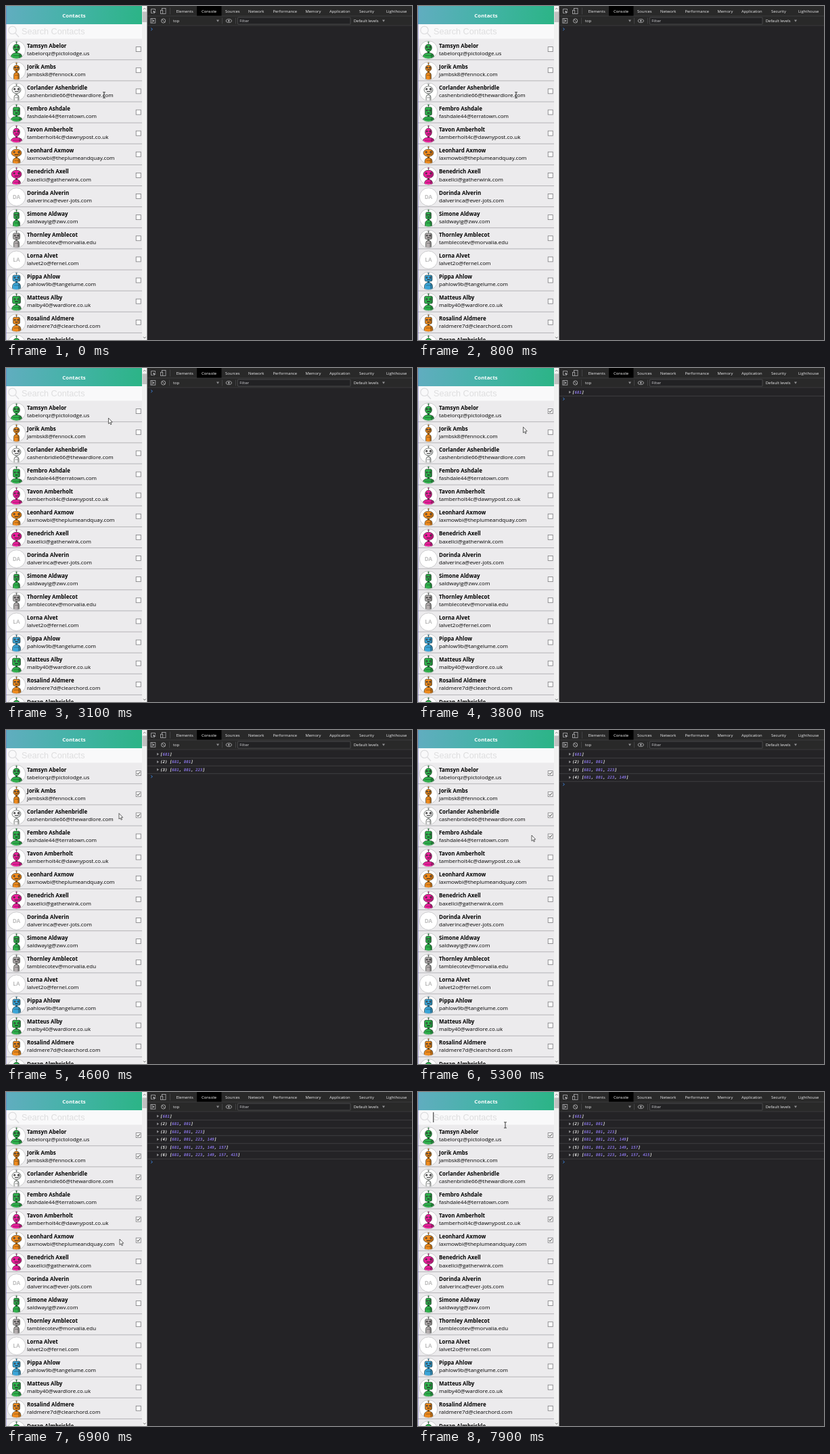
Recreate the animation shown at these times as an HTML page with a canvas. Size 600x495 px, loop 8 s.

```html
<!DOCTYPE html>
<html lang="en">
<head>
<meta charset="utf-8">
<title>Contacts</title>
<style>
  html, body { margin: 0; width: 100%; height: 100%; overflow: hidden; background: #242326; }
  canvas { display: block; width: 600px; height: 495px; }
</style>
</head>
<body>
<canvas id="stage"></canvas>
<script>
const LOOP = 8000, STEP = 100, W = 600, H = 495;
const ROW = 31.13, TOP = 49;
const SANS = '"Open Sans", "Noto Sans", sans-serif';
const ARIAL = '"Liberation Sans", Arial, sans-serif';
const MONO = '"DejaVu Sans Mono", monospace';
const UI = '500 5.88px ' + SANS;

const canvas = document.getElementById('stage');
const ctx = canvas.getContext('2d');
const dpr = window.devicePixelRatio || 1;
canvas.width = W * dpr;
canvas.height = H * dpr;

const GREEN = '#2fb04c', ORANGE = '#ee8a1d', PINK = '#ec1f9c', GREY = '#b3adae', BLUE = '#3ba5d8', WHITE = '#f4f4f4';

// name, email, then avatar: initials or [colour, head shape, head width, head height, body width]
const people = [
  ['Tamsyn Abelor', 'tabelorqz@pictolodge.us', [GREEN, 'egg', 10, 11, 17]],
  ['Jorik Ambs', 'jambsk8@fennock.com', [ORANGE, 'egg', 9, 9, 8]],
  ['Corlander Ashenbridle', 'cashenbridle66@thewardlore.com', [WHITE, 'egg', 13, 11, 7]],
  ['Fembro Ashdale', 'fashdale44@terratown.com', [GREEN, 'box', 10, 12, 18]],
  ['Tavon Amberholt', 'tamberholt4c@dawnypost.co.uk', [PINK, 'egg', 10, 12, 18]],
  ['Leonhard Axmow', 'laxmowbi@theplumeandquay.com', [ORANGE, 'egg', 15, 11, 11]],
  ['Benedrich Axell', 'baxellci@gatherwink.com', [PINK, 'egg', 15, 12, 12]],
  ['Dorinda Alverin', 'dalverinca@ever-jots.com', 'DA'],
  ['Simone Aldway', 'saldwayig@zwv.com', [GREEN, 'box', 8, 10, 10]],
  ['Thornley Amblecot', 'tamblecotev@morvalia.edu', [GREY, 'box', 10, 9, 8]],
  ['Lorna Alvet', 'lalvet2o@fernel.com', 'LA'],
  ['Pippa Ahlow', 'pahlow9b@tangelume.com', [BLUE, 'box', 11, 9, 12]],
  ['Matteus Alby', 'malby40@wardlore.co.uk', [GREEN, 'box', 12, 11, 14]],
  ['Rosalind Aldmere', 'raldmere7d@clearchord.com', [ORANGE, 'box', 10, 10, 13]],
  ['Doran Almbrickle', '', [GREEN, 'egg', 10, 11, 14]]
];

const ids = [681, 801, 223, 149, 157, 415];
const clicks = [3400, 4000, 4600, 5100, 5700, 6500];
const FOCUS = 7600;

// time, x, y of the pointer
const path = [
  [0, 145, 132], [1800, 145, 132], [2200, 143, 134], [2800, 143, 134],
  [3200, 153, 63], [3500, 153, 63], [3800, 155.5, 87.5], [4100, 157, 91],
  [4500, 167, 123.5], [4700, 167, 123.5], [5000, 168, 154], [5300, 168, 156],
  [5600, 168.5, 185], [5900, 168.5, 185.5], [6400, 168, 217], [6900, 168, 218],
  [7500, 131, 47], [7800, 129, 49], [8000, 129, 49]
];

function rect(x, y, w, h, color) {
  ctx.fillStyle = color;
  ctx.fillRect(x, y, w, h);
}

function text(s, x, y, font, color, align = 'left') {
  ctx.font = font;
  ctx.fillStyle = color;
  ctx.textAlign = align;
  ctx.fillText(s, x, y);
}

function line(points, color, width = 1) {
  ctx.beginPath();
  points.forEach(([x, y], i) => i ? ctx.lineTo(x, y) : ctx.moveTo(x, y));
  ctx.strokeStyle = color;
  ctx.lineWidth = width;
  ctx.stroke();
}

function paint(fill, stroke, width = 0.7) {
  if (fill) { ctx.fillStyle = fill; ctx.fill(); }
  if (stroke) { ctx.strokeStyle = stroke; ctx.lineWidth = width; ctx.stroke(); }
}

function poly(points, fill, stroke) {
  ctx.beginPath();
  points.forEach(([x, y]) => ctx.lineTo(x, y));
  ctx.closePath();
  paint(fill, stroke);
}

function ellipse(x, y, rx, ry, fill, stroke, width) {
  ctx.beginPath();
  ctx.ellipse(x, y, rx, ry, 0, 0, 7);
  paint(fill, stroke, width);
}

function box(x, y, w, h, r, fill, stroke) {
  ctx.beginPath();
  ctx.roundRect(x, y, w, h, r);
  paint(fill, stroke);
}

function robot(cx, cy, [color, shape, w, h, body]) {
  const ink = 'rgba(20,30,25,.8)', shade = 'rgba(0,0,0,.25)';
  const top = cy - 8.5, neck = top + h - 1, chest = top + h + 2;
  line([[cx, top], [cx, top - 3]], ink, 0.8);
  ellipse(cx, top - 3, 1.1, 0.8, color, ink, 0.5);
  rect(cx - 1.6, neck, 3.2, 5, color);
  line([[cx - 1.6, neck + 2.2], [cx + 1.6, neck + 2.2]], ink, 0.8);
  box(cx - body / 2, chest, body, 14, body * 0.45, color, ink);
  box(cx + body * 0.2, chest + 1, body * 0.25, 14, 1, shade);
  line([[cx - body * 0.3, chest + 4], [cx + body * 0.3, chest + 4]], ink, 0.5);
  if (shape === 'egg') {
    ellipse(cx, top + h / 2, w / 2, h / 2, color, ink);
    ellipse(cx + w * 0.3, top + h / 2, w * 0.13, h * 0.35, shade);
  } else {
    box(cx - w / 2, top, w, h, 2, color, ink);
    box(cx + w * 0.25, top + 0.5, w * 0.22, h - 1, 1, shade);
  }
  for (const side of [-1, 1]) {
    const x = cx + side * w * 0.22, y = top + h * 0.4;
    ellipse(x, y, 1.3, 1.3, '#222');
    ellipse(x, y, 0.45, 0.45, '#eee');
  }
  line([[cx - w * 0.2, top + h * 0.73], [cx + w * 0.2, top + h * 0.73]], '#222', 1.1);
}

function avatar(y, look) {
  const cx = 15.5, cy = y + 16, r = 13.3;
  ctx.save();
  ctx.beginPath();
  ctx.arc(cx, cy, r, 0, 7);
  ctx.clip();
  rect(cx - r, cy - r, 2 * r, 2 * r, '#fff');
  if (typeof look === 'string') text(look, cx, cy + 3.1, 'bold 8.2px ' + SANS, '#bdbdbd', 'center');
  else robot(cx, cy, look);
  ctx.restore();
  ellipse(cx, cy, r, r, null, '#c6c6c8', 0.9);
}

function checkbox(y, on) {
  rect(192, y, 7.4, 7.4, '#fff');
  ctx.strokeStyle = '#77777a';
  ctx.lineWidth = 0.8;
  ctx.strokeRect(192.2, y + 0.2, 7, 7);
  if (on) line([[193.6, y + 3.8], [195, y + 5.4], [198, y + 1.8]], '#333', 1);
}

function contacts(t) {
  rect(0, 0, 201, H, '#ecebed');
  people.forEach(([name, email, look], i) => {
    const y = TOP + i * ROW;
    avatar(y, look);
    text(name, 31, y + 12.7, 'bold 7.95px ' + SANS, '#000');
    text(email, 31, y + 23.8, '8px ' + SANS, '#000');
    checkbox(y + 11.4, t >= clicks[i]);
    rect(0, y + ROW - 0.9, 201, 1, '#b4b3b7');
  });

  const g = ctx.createLinearGradient(0, 0, 201, 27);
  g.addColorStop(0, '#61adc0');
  g.addColorStop(0.5, '#43b3a6');
  g.addColorStop(1, '#2bb486');
  rect(0, 0, 201, 27, g);
  text('Contacts', 100.5, 17.4, 'bold 7.8px ' + SANS, '#fff', 'center');

  rect(0, 27, 201, 21.5, '#f9f9fa');
  ellipse(9.5, 35.8, 5.7, 5.7, null, '#dcdcde', 1.2);
  line([[13.6, 40], [19, 46]], '#dcdcde', 1.3);
  text('Search Contacts', 23, 42, '12.65px ' + ARIAL, '#dededf');
  if (t >= FOCUS) rect(22.3, 30, 1, 15, '#222');
  rect(0, 0, 0.7, H, 'rgba(110,100,215,.6)');

  rect(201, 0, 7.5, H, '#f1f1f1');
  rect(201.5, 8.5, 6.5, 15.5, '#c1c1c1');
  line([[203, 5], [204.8, 3.2], [206.6, 5]], '#777', 0.9);
  line([[203, 490.5], [204.8, 492.3], [206.6, 490.5]], '#555', 0.9);
}

function icons() {
  const c = '#b0b0b3';
  line([[217, 10.5], [214.5, 10.5], [214.5, 4.5], [220.5, 4.5], [220.5, 7]], c, 0.8);
  poly([[217, 6.8], [222, 9], [219.6, 9.7], [218.8, 12]], c);
  ctx.strokeStyle = c;
  ctx.lineWidth = 0.8;
  ctx.strokeRect(230.5, 3.5, 5.5, 8);
  rect(228, 6, 4, 6, '#292929');
  ctx.strokeRect(228.5, 6.3, 3.2, 5.2);
  ctx.strokeRect(213.8, 18.6, 7, 6.6);
  line([[215.8, 18.6], [215.8, 25.2]], c, 0.8);
  poly([[217, 20.2], [219.6, 21.9], [217, 23.6]], c);
  ellipse(232.6, 22, 3.1, 3.1, null, c, 0.9);
  line([[230.5, 19.9], [234.7, 24.1]], c, 0.9);
  ellipse(329.3, 22, 4.1, 2.5, null, c, 0.9);
  ellipse(329.3, 22, 1.3, 1.3, c);
  for (const x of [313, 558]) poly([[x - 2, 20.6], [x + 2, 20.6], [x, 23.8]], '#909093');
  rect(242, 2.5, 0.8, 10, '#48484a');
  for (const x of [241, 319, 339]) rect(x, 17.5, 0.8, 9, '#48484a');
}

function tools() {
  rect(208, 0, 392, H, '#242326');
  rect(209, 0, 391, 29, '#292929');
  rect(209, 14.5, 391, 0.8, '#414143');
  rect(209, 28.6, 391, 0.8, '#3d3d40');
  rect(282, 0, 36.5, 14.5, '#000');
  const tabs = [['Elements', 251.5], ['Console', 289], ['Sources', 324], ['Network', 358], ['Performance', 394.5],
    ['Memory', 442.5], ['Application', 478], ['Security', 522], ['Lighthouse', 562]];
  for (const [s, x] of tabs) text(s, x, 10, UI, s === 'Console' ? '#fff' : '#ececee');
  icons();
  text('top', 247, 24.2, UI, '#ececee');
  box(342.5, 17, 166.5, 10, 0.5, '#222224', '#57575a');
  text('Filter', 345.3, 24.2, UI, '#d2d2d5');
  text('Default levels', 513.8, 24.2, UI, '#ececee');
}

function logLine(n, y) {
  poly([[223, y - 2], [226.2, y], [223, y + 2]], '#8b8b8e');
  const font = 'italic bold 5.77px ' + MONO;
  let x = 228;
  const put = (s, color) => {
    text(s, x, y + 2.1, font, color);
    x += ctx.measureText(s).width;
  };
  put((n > 1 ? `(${n}) ` : '') + '[', '#f0f0f0');
  ids.slice(0, n).forEach((id, i) => {
    if (i) put(', ', '#f0f0f0');
    put(id, '#8672e0');
  });
  put(']', '#f0f0f0');
}

function log(t) {
  const count = clicks.filter(c => t >= c).length;
  for (let i = 0; i < count; i++) {
    const y = 35.7 + i * 11.52;
    logLine(i + 1, y);
    rect(209, y + 5.5, 391, 0.9, '#414043');
  }
  const y = 34.4 + count * 11.55;
  line([[214.3, y - 1.8], [216.4, y], [214.3, y + 1.8]], '#3a80d8', 1);
}

function pointer(t) {
  const i = Math.max(1, path.findIndex(p => p[0] > t));
  const [t0, x0, y0] = path[i - 1], [t1, x1, y1] = path[i];
  const u = (t - t0) / (t1 - t0), k = u * u * (3 - 2 * u);
  const x = x0 + (x1 - x0) * k, y = y0 + (y1 - y0) * k;
  if (t <= 2900 || t >= 7500) {
    line([[x, y - 4], [x, y + 4]], '#222', 0.9);
    for (const d of [-4.2, 4.2]) line([[x - 2, y + d], [x + 2, y + d]], '#222', 0.8);
  } else {
    const shape = [[0, 0], [0, 8.5], [1.9, 6.8], [3.2, 9.7], [4.5, 9.1], [3.2, 6.3], [5.7, 6.1]];
    poly(shape.map(([a, b]) => [x + a, y + b]), '#fff', '#222');
  }
}

let start;
function frame(now) {
  start ??= now;
  const t = Math.floor((now - start) % LOOP / STEP) * STEP;
  ctx.setTransform(dpr, 0, 0, dpr, 0, 0);
  tools();
  contacts(t);
  log(t);
  pointer(t);
  requestAnimationFrame(frame);
}
requestAnimationFrame(frame);
</script>
</body>
</html>
```
